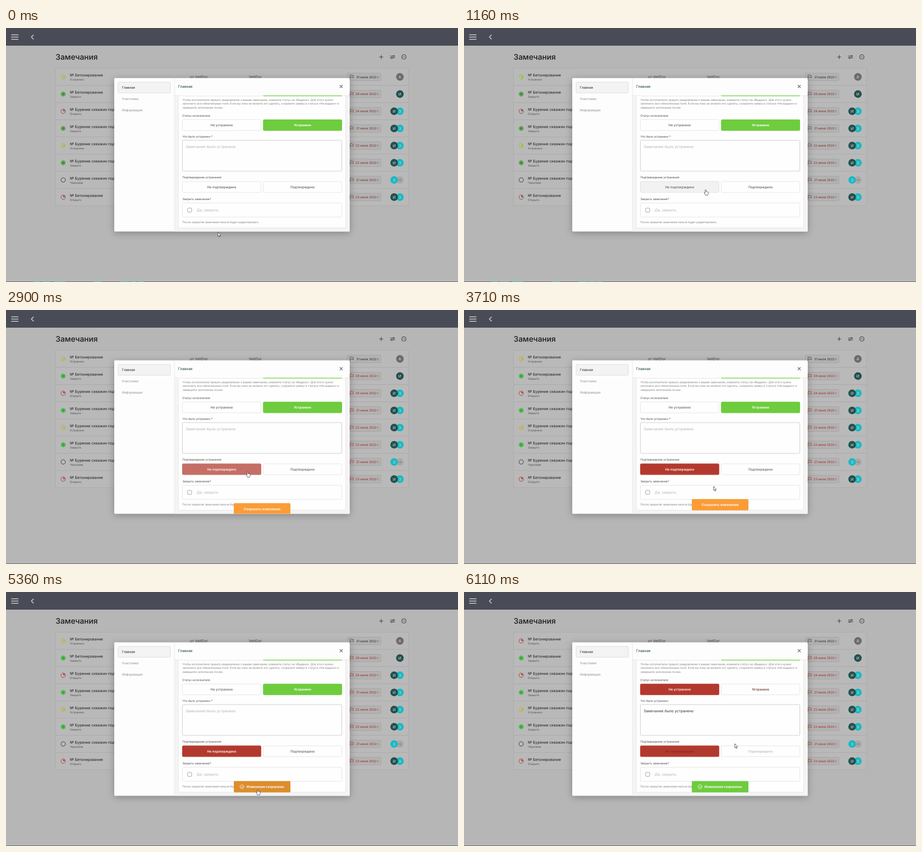
An HTML page for the animation above (6.14 s loop, 998 px wide and 561 px high).

```html
<!DOCTYPE html>
<html lang="ru">
<head>
<meta charset="utf-8">
<title>Замечания</title>
<style>
html, body { margin: 0; height: 100%; overflow: hidden; background: #b6b6b6; }
svg { display: block; width: 100vw; height: 100vh; font-family: Inter, "Open Sans", sans-serif; text-rendering: geometricPrecision; }

/* every animation shares one clock */
svg, .anim { animation: 6140ms linear infinite; }
svg { animation-name: tint; animation-timing-function: step-end; }
.step { animation-timing-function: step-end; }

.line { fill: none; stroke-linecap: round; stroke-linejoin: round; }
.mid { text-anchor: middle; }
.name { font-size: 8.2px; fill: #1d1d1d; }
.sub { font-size: 6.15px; fill: #4f4f4f; }
.date { font-size: 6.8px; text-anchor: end; }
.nav { font-size: 7.15px; fill: #8b8b8b; }
.small { font-size: 6.05px; fill: #7b7b7b; }
.label { font-size: 6.2px; fill: #3c3c3c; }
.btn { font-size: 7.15px; font-weight: 600; fill: #6d6d6d; text-anchor: middle; }
.on { fill: #fff; font-weight: 700; }
.field { fill: #fefefe; stroke: #e2e2e2; }
.hint { font-size: 8.1px; fill: #b4b4b4; }

.cyan { animation-name: first; }
.shift { animation-name: shift; }
.before { animation-name: before; }
.after { animation-name: after; }
.asking { animation-name: asking; }
.saved { animation-name: saved; }
.reject { animation-name: reject; }
.reject-text { animation-name: reject-text; }
.accept-text { animation-name: accept-text; }
.unfixed { animation-name: unfixed; }
.unfixed-text { animation-name: unfixed-text; }
.fixed { animation-name: fixed; }
.fixed-text { animation-name: fixed-text; }
.answer { animation-name: answer; }
.close-box { animation-name: close-box; }
.rise { animation-name: rise; }
.save { animation-name: save; }
.spot { animation-name: spot; }
.cursor { animation-name: cursor; }
.arrow { animation-name: arrow; }
.hand { animation-name: hand; }

@keyframes tint {
  0% { --fix: #94c531; --done: #3c9732; --open: #88382f; --late: #7d2a24; --flag: #79534f; }
  43.16%, 100% { --fix: #c3b42c; --done: #2bb52b; --open: #b02c24; --late: #a5231b; --flag: #ad4a34; }
}
@keyframes first { 0% { opacity: 1 } 43.16%, 100% { opacity: 0 } }
@keyframes shift { 0% { transform: none } 43.16%, 100% { transform: translateY(.6px) } }
@keyframes before { 0% { opacity: 1 } 88.8%, 100% { opacity: 0 } }
@keyframes after { 0% { opacity: 0 } 88.8%, 100% { opacity: 1 } }
@keyframes asking { 0% { opacity: 1 } 87.25%, 100% { opacity: 0 } }
@keyframes saved { 0% { opacity: 0 } 87.25%, 100% { opacity: 1 } }
@keyframes reject {
  0%, 7.7% { fill: #fefefe; stroke: #e2e2e2 }
  9.4% { fill: #f2f2f2; stroke: #dedede }
  43.81% { fill: #f2f2f2; stroke: #dedede; animation-timing-function: ease }
  51.95%, 100% { fill: #b3392e; stroke: #b3392e }
}
@keyframes reject-text {
  0%, 43.16% { fill: #6d6d6d }
  46.5%, 88.8% { fill: #fff }
  92%, 100% { fill: #87291f }
}
@keyframes accept-text { 0%, 88.8% { fill: #6d6d6d } 92%, 100% { fill: #bdbdbd } }
@keyframes unfixed {
  0%, 88.8% { fill: #fefefe; stroke: #e2e2e2 }
  92%, 100% { fill: #b3392e; stroke: #b3392e }
}
@keyframes unfixed-text { 0%, 88.8% { fill: #6d6d6d } 92%, 100% { fill: #fff } }
@keyframes fixed {
  0%, 88.8% { fill: #6ecc3e; stroke: #6ecc3e }
  92%, 100% { fill: #fefefe; stroke: #e2e2e2 }
}
@keyframes fixed-text { 0%, 88.8% { fill: #fff } 92%, 100% { fill: #85503f } }
@keyframes answer { 0%, 88.8% { fill: #b4b4b4 } 90%, 100% { fill: #303030 } }
@keyframes close-box {
  0%, 4.2%, 7.5%, 60.5%, 63%, 94.2%, 99.4%, 100% { stroke: #e2e2e2 }
  5.5%, 61.8%, 96% { stroke: #cacaca }
}
@keyframes rise {
  0% { transform: translateY(33px) }
  43.81% { transform: translateY(33px); animation-timing-function: ease }
  51.95%, 100% { transform: none }
}
@keyframes save {
  0%, 62% { fill: #fb9c37 }
  64%, 87.24% { fill: #ef812b }
  87.25% { fill: #de8c2d }
  92.2%, 100% { fill: #6ecc3e }
}
@keyframes spot {
  0%, 70.69% { opacity: 0 }
  70.7%, 71.4% { opacity: .9 }
  75%, 100% { opacity: 0 }
}
@keyframes cursor {
  0% { transform: translate(468px, 451px) }
  .49% { transform: translate(468px, 451px); animation-timing-function: ease-in-out }
  9.45% { transform: translate(533.5px, 357px) }
  53.58% { transform: translate(533.5px, 357px); animation-timing-function: ease-in }
  60.42% { transform: translate(551px, 389px) }
  62.87% { transform: translate(556px, 433px) }
  63.68% { transform: translate(556px, 433px) }
  66.78%, 70.85% { transform: translate(558.5px, 436px) }
  80.13% { transform: translate(555.5px, 436px) }
  92% { transform: translate(555.5px, 436px); animation-timing-function: ease-in-out }
  99.45%, 100% { transform: translate(598px, 335px) }
}
@keyframes arrow {
  0% { opacity: 1 } 7.7% { opacity: 0 }
  56.6% { opacity: 1 } 62% { opacity: 0 }
  94.2%, 100% { opacity: 1 }
}
@keyframes hand {
  0% { opacity: 0 } 7.7% { opacity: 1 }
  56.6% { opacity: 0 } 62% { opacity: 1 }
  94.2%, 100% { opacity: 0 }
}
</style>
</head>
<body>
<svg viewBox="0 0 998 561">
  <defs>
    <clipPath id="card"><rect x="239" y="110.5" width="520" height="339" rx="2"/></clipPath>
    <clipPath id="scroll"><rect x="372" y="149" width="387" height="301"/></clipPath>
  </defs>

  <rect width="998" height="561" fill="#b6b6b6"/>
  <rect width="998" height="39" fill="#494c56"/>
  <g class="line" stroke="#bababa" stroke-width="2">
    <path d="M12.3 15H26.7M12.3 20H26.7M12.3 25H26.7"/>
    <path d="M60.5 15.5L56 20L60.5 24.5"/>
  </g>
  <text x="109.5" y="70" font-size="17" font-weight="500" fill="#1b1b1b">Замечания</text>
  <g class="line" stroke="#2b2b2b">
    <path d="M828.5 60V68M824.5 64H832.5"/>
    <path d="M848.5 62H854M857.4 62H858.5M848.5 66H849.6M853 66H858.5"/>
    <circle cx="855.7" cy="62" r="1.6"/><circle cx="851.3" cy="66" r="1.6"/>
    <rect x="873.8" y="59.2" width="9.4" height="9.4" rx="3.6"/>
    <path d="M876.3 64H876.4M878.5 64H878.6M880.6 64H880.7" stroke-width="1.3"/>
  </g>
  <g id="list"></g>
  <path d="M0 560.5H998" stroke="#55585c"/>
  <path class="anim step cyan" d="M60 560.5H75M80 560.5H99M106 560.5H131M193 560.5H211M253 560.5H272M276 560.5H288M292 560.5H305" stroke="#2fb3c4"/>

  <g class="anim step shift">
    <rect x="239" y="110.5" width="520" height="339" rx="2" fill="#fdfdfd" style="filter:drop-shadow(0 3px 8px rgba(0,0,0,.28))"/>
    <g clip-path="url(#card)">
      <rect x="372" y="149" width="387" height="301" fill="#f4f4f4"/>
      <path d="M372 110V450" stroke="#e6e6e6"/>
      <rect x="247.5" y="119.5" width="115.5" height="24" rx="2" fill="#f3f3f3" stroke="#dcdcdc"/>
      <text class="nav" x="256" y="134" style="fill:#333;font-weight:500">Главная</text>
      <text class="nav" x="256" y="159">Участники</text>
      <text class="nav" x="256" y="184">Информация</text>
      <text x="380" y="132.3" font-size="7.9" font-weight="500" fill="#29504a">Главная</text>
      <path class="line" d="M737.4 126.4L742.8 131.8M742.8 126.4L737.4 131.8" stroke="#333" stroke-width="1.2"/>

      <g clip-path="url(#scroll)">
        <rect x="380.5" y="140" width="369.5" height="301.5" rx="2" fill="#fefefe" stroke="#e4e4e4"/>
        <path d="M372 149H759" stroke="#dedede" stroke-width="1.4"/>
        <rect class="field" x="389.5" y="126" width="173.5" height="24.3" rx="2"/>
        <rect x="567.5" y="126" width="174.5" height="24.6" rx="2" fill="#6ecc3e"/>
        <g class="small">
          <text x="389.5" y="161">Чтобы исполнителю пришло уведомление о вашем замечание, измените статус на «Выдано». Для этого нужно</text>
          <text x="389.5" y="169.3">заполнить все обязательные поля. Если вы пока не можете это сделать, сохраните заявку в статусе «Не выдано» и</text>
          <text x="389.5" y="177.6">завершите заполнение позже.</text>
        </g>

        <text class="label" x="389.5" y="195.8">Статус исполнителя</text>
        <rect class="field anim unfixed" x="389.5" y="202.5" width="173.5" height="24" rx="2"/>
        <text class="btn anim unfixed-text" x="476.3" y="217.2">Не устранено</text>
        <rect class="field anim fixed" x="568" y="202.5" width="173.5" height="24" rx="2"/>
        <text class="btn on anim fixed-text" x="654.8" y="217.2">Устранено</text>

        <text class="label" x="389.5" y="241.6">Что было устранено<tspan class="anim step before" id="star"> *</tspan></text>
        <rect class="field" x="389.5" y="248" width="352" height="68" rx="2" style="stroke:#c6c6c6"/>
        <text class="hint anim answer" x="396.5" y="264.9">Замечание было устранено</text>

        <text class="label" x="389.5" y="332.3">Подтверждение устранения</text>
        <rect class="field anim reject" x="389.5" y="339" width="173.5" height="24" rx="2"/>
        <text class="btn anim reject-text" x="476.3" y="353.7">Не подтверждено</text>
        <rect class="field" x="568" y="339" width="173.5" height="24" rx="2"/>
        <text class="btn anim accept-text" x="654.8" y="353.7">Подтверждено</text>

        <text class="label" x="389.5" y="379.8">Закрыть замечание?</text>
        <rect class="field anim close-box" x="389.5" y="386.5" width="352" height="31" rx="2"/>
        <rect x="401" y="397.7" width="9" height="9" rx="2.4" fill="#fff" stroke="#8f8f8f"/>
        <text class="hint" x="421" y="405.1">Да, закрыть</text>
        <text class="small" x="389.5" y="431">После закрытия замечания нельзя будет редактировать</text>

        <g class="anim rise">
          <rect class="anim save" x="503" y="417" width="125" height="25" rx="2"/>
          <text class="btn on anim step asking" x="565.5" y="432.1">Сохранить изменения</text>
          <g class="anim step saved">
            <path class="line" d="M525.2 428.3A4.3 4.3 0 1 1 523.2 425.8M519.2 429.3L521 431.1L525.3 426.7" stroke="#fff"/>
            <text class="btn on" x="572.3" y="432.1">Изменения сохранены</text>
          </g>
        </g>
      </g>
    </g>
  </g>

  <circle class="anim spot" cx="557.5" cy="436" r="6.5" fill="#f6c414"/>
  <g class="anim cursor">
    <path class="anim step arrow" d="M0 0V9.2L2 7.4L3.4 10.6L4.9 9.9L3.5 6.9H6.1Z" fill="#fff" stroke="#222" stroke-width=".8" stroke-linejoin="round"/>
    <path class="anim step hand" d="M-1.1 1Q0-.6 1.1 1V4.4Q2.3 3.7 3 4.9Q4.2 4.3 4.7 5.4Q5.8 5.1 5.8 6.6V8.6Q5.6 10.4 4.6 11V12.3H-.5V11.2Q-2.4 9.2-3.5 6.9Q-3.3 5.4-1.1 7.3Z" fill="#fff" stroke="#222" stroke-width=".8" stroke-linejoin="round"/>
  </g>
</svg>

<script>
const PIT = 'Бетонирование', DRILL = 'Бурение скважин под';
const STATES = {
  fix: ['Устранено', 'M0-3.5A3.5 3.5 0 0 1 0 3.5Z'],
  done: ['Закрыто', 'M0-3.6A3.6 3.6 0 0 1 0 3.6A3.6 3.6 0 0 1 0-3.6Z'],
  open: ['Открыто', 'M0 0V-3.5A3.5 3.5 0 0 1 3.5 0Z'],
  draft: ['Черновик', '']
};
const ROWS = [
  [PIT, 'fix', '31 июля', 'А'], [PIT, 'done', '28 июня', 'И'],
  [DRILL, 'open', '24 июня', 'ИЗ'], [DRILL, 'done', '21 июня', 'ИЗ'],
  [DRILL, 'fix', '22 июня', 'ИЗ'], [DRILL, 'done', '22 июня', 'ИЗ'],
  [DRILL, 'draft', '21 июня', 'З+'], [PIT, 'open', '23 июня', 'ИЗ']
];
const FACES = { 'А': '#6c6c6c', 'И': '#24504e', 'З': '#1db9c1', '+': '#a9a9a9' };
const STEP = 37.93;

function status(key, cls = '') {
  const [label, pie] = STATES[key];
  const color = `var(--${key}, #242424)`;
  return `<g class="${cls}"><circle cx="126.3" cy="19" r="4.9" fill="none" style="stroke:${color}"/>
    <path d="${pie}" transform="translate(126.3 19)" style="fill:${color}"/>
    <text class="sub" x="141" y="27.2">${label}</text></g>`;
}

function face(who, x) {
  const more = who === '+';
  return `<circle cx="${x}" cy="19" r="8.4" fill="${FACES[who]}"/>
    <text class="mid" x="${x}" y="${more ? 21.2 : 22}" font-size="${more ? 6 : 8.2}" fill="${more ? '#555' : '#dedede'}">${more ? '+2' : who}</text>`;
}

function row([title, key, day, who], i) {
  const first = i === 0;
  const ink = first ? '#222' : 'var(--late)';
  const flag = first ? '#444' : 'var(--flag)';
  const faces = [...who].map((c, n) => face(c, who.length > 1 && n === 0 ? 857 : 869.7)).reverse().join('');
  return `<g transform="translate(0 ${89 + i * STEP})">
    <rect x="109.5" y="0" width="779" height="${STEP}" fill="#b9b9b9" stroke="#a8a8a8" stroke-width=".9"/>
    ${first ? status('fix', 'anim step before') + status('open', 'anim step after') : status(key)}
    <text class="name" x="141" y="18.1">№ ${title}</text>
    ${first ? '<text class="name" x="406" y="22" style="fill:#444">от VeltDor</text><text class="name" x="536" y="22" style="fill:#444">VeltDor</text>' : ''}
    <rect x="753.5" y="10.6" width="74.5" height="16.8" rx="2" fill="#b2b2b2" stroke="#a1a1a1" stroke-width=".9"/>
    <path class="line" d="M759.6 24V14.8H764V16H767.6L766.4 18.3L767.6 20.4H763.4V19.3H759.6" style="stroke:${flag}" stroke-width=".9"/>
    <text class="date" x="824.6" y="21.5" style="fill:${ink}">${day} 2022 г.</text>
    ${faces}</g>`;
}

document.getElementById('list').innerHTML = ROWS.map(row).join('');

// tspans ignore opacity, so the required mark is shown by its fill
const star = document.getElementById('star');
star.classList.remove('anim', 'step', 'before');
star.animate([{ fill: '#3c3c3c', offset: 0 }, { fill: '#3c3c3c', offset: .888 },
  { fill: 'transparent', offset: .888 }, { fill: 'transparent', offset: 1 }],
  { duration: 6140, iterations: Infinity });
</script>
</body>
</html>
```
